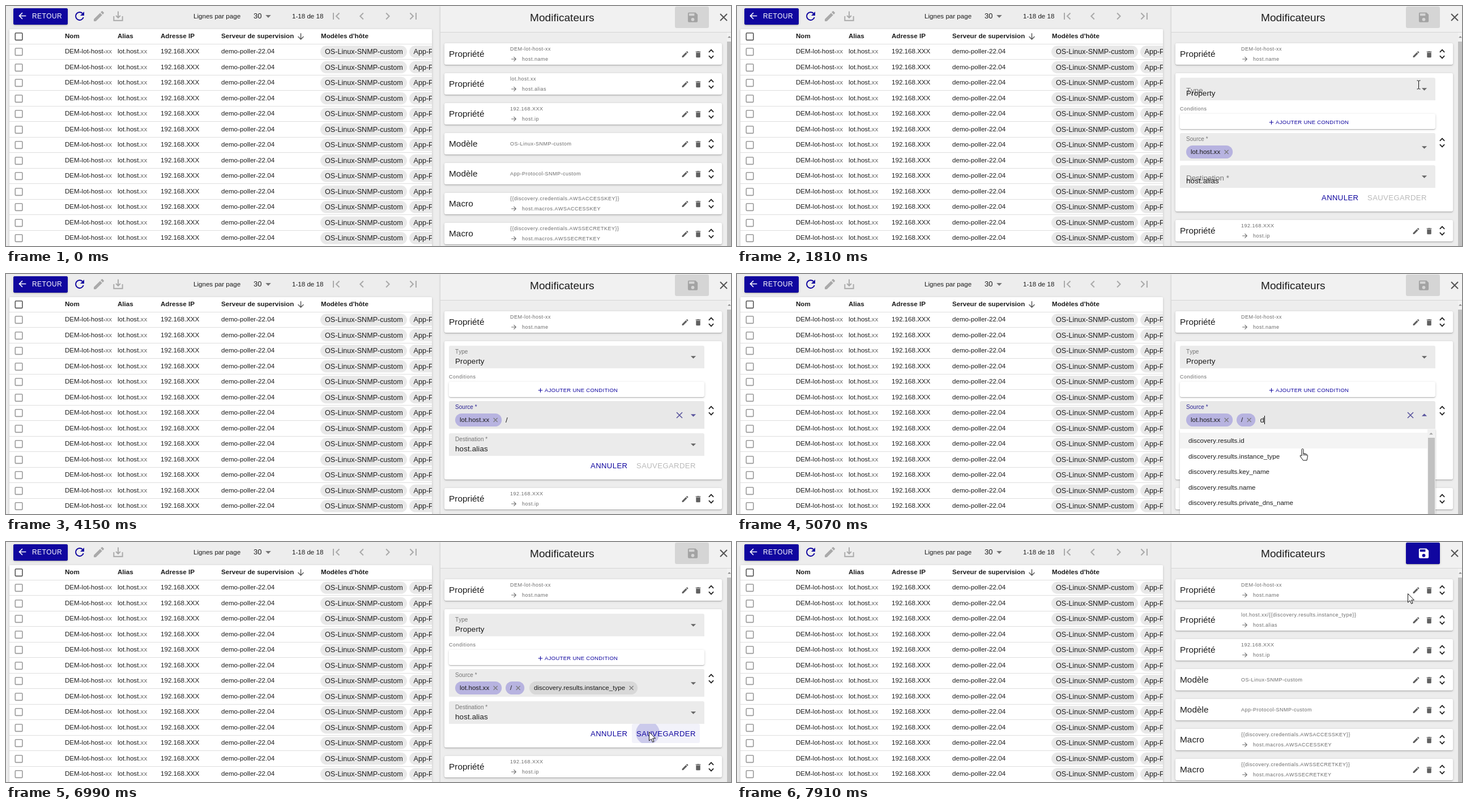
Write an HTML page with a canvas that moves like this. It is 1280 px wide and 425 px high and loops after 8 s.

```html
<!DOCTYPE html>
<html lang="fr">
<head>
<meta charset="utf-8">
<title>Modificateurs</title>
<style>
html, body { margin: 0; height: 100%; overflow: hidden; background: #ededed; }
canvas { display: block; }
</style>
</head>
<body>
<canvas id="stage" width="1280" height="425"></canvas>
<script>
const c = document.getElementById('stage').getContext('2d');
const BLUE = '#10069f', INK = '#1c1c1c', GREY = '#757575', PALE = '#a9a9a9';
const HOST = 'DEM-lot-host-', ALIAS = 'lot.host.', IP = '192.168.XXX';

// Icons on a 24 unit grid: [stroked path, filled path]
const ICONS = {
  back: ['M20 12H5M12 5l-7 7 7 7'],
  forward: ['M4 12h15M12 5l7 7-7 7'],
  down: ['M12 4v15M5 12l7 7 7-7'],
  close: ['M6 6l12 12M18 6L6 18'],
  plus: ['M12 5v14M5 12h14'],
  unfold: ['M7.5 8.5L12 4l4.5 4.5M7.5 15.5L12 20l4.5-4.5'],
  first: ['M17.5 6.5L12 12l5.5 5.5M7 6v12'],
  prev: ['M14.5 6.5L9 12l5.5 5.5'],
  next: ['M9.5 6.5L15 12l-5.5 5.5'],
  last: ['M6.5 6.5L12 12l-5.5 5.5M17 6v12'],
  refresh: ['M18.7 14A7 7 0 1 1 17 7', 'M13 11h7V4z'],
  download: ['M4 12v8h16v-8M12 3v12M8 11l4 4 4-4'],
  caret: ['', 'M7 10l5 5 5-5z'],
  caretUp: ['', 'M7 14l5-5 5 5z'],
  edit: ['', 'M3 17.3V21h3.7L17.8 9.9l-3.7-3.7zM20.7 7c.4-.4.4-1 0-1.4l-2.3-2.3c-.4-.4-1-.4-1.4 0l-1.9 1.8 3.8 3.8z'],
  trash: ['', 'M6 19q0 2 2 2h8q2 0 2-2V7H6zM19 4h-3.5l-1-1h-5l-1 1H5v2h14z'],
  save: ['', 'M17 3H5q-2 0-2 2v14q0 2 2 2h14q2 0 2-2V7zM12 19a3 3 0 1 1 0-6 3 3 0 0 1 0 6zM15 9H5V5h10z'],
};
for (const k in ICONS) ICONS[k] = ICONS[k].map(d => new Path2D(d));

const ARROW = new Path2D('M0 0V15.5l3.6-3.3 2.5 5.6 2.4-1-2.4-5.4H11z');
const HAND = new Path2D('M-3.5 1.5c0-2 3-2 3 0V8l5.5 1.7q2.5 1 2 4L5.5 20.5H-1L-6 13.5q-.8-2.2 1-2l1.5 1.2z');
const BEAM = new Path2D('M-3-7.5h2L0-6.5l1-1h2M0-6.5v13M-3 7.5h2l1-1 1 1h2');

function icon(name, x, y, size, color) {
  const [line, solid] = ICONS[name];
  c.save();
  c.translate(x - size / 2, y - size / 2);
  c.scale(size / 24, size / 24);
  c.strokeStyle = c.fillStyle = color;
  c.lineWidth = 2;
  c.stroke(line);
  if (solid) c.fill(solid, 'evenodd');
  c.restore();
}

// Text with its capitals centred on y and a whole-pixel baseline; returns the width
function text(str, x, y, size, color = INK, gap = 0, weight = 400) {
  c.font = `${weight} ${size}px "Liberation Sans", Arial, sans-serif`;
  c.fontKerning = 'none';
  c.letterSpacing = gap + 'px';
  c.fillStyle = color;
  c.fillText(str, x, Math.round(y + size * .36 - .2));
  return c.measureText(str).width;
}
const small = (str, x, y) => text(str, x, y, 9, '#6b6b6b', .5);

// Rounded box; a raised one has a tight shadow below and a faint wide one
function box(x, y, w, h, r, fill, raised) {
  c.save();
  c.fillStyle = fill;
  c.beginPath();
  c.roundRect(x, y, w, h, r);
  if (raised) {
    c.shadowOffsetY = 1;
    c.shadowColor = 'rgba(0,0,0,.16)';
    c.shadowBlur = 4;
    c.fill();
    c.shadowColor = 'rgba(0,0,0,.22)';
    c.shadowBlur = 1;
  }
  c.fill();
  c.restore();
}

function disc(x, y, r, fill) {
  c.fillStyle = fill;
  c.beginPath();
  c.arc(x, y, r, 0, 7);
  c.fill();
}

function checkbox(y, color) {
  c.strokeStyle = color;
  c.lineWidth = 1.6;
  c.beginPath();
  c.roundRect(16.3, y - 6.2, 12.6, 12.6, 1.5);
  c.stroke();
}

function drawTable() {
  box(13, 4, 96, 29, 3, BLUE, true);
  icon('back', 29, 17.5, 19, '#fff');
  text('RETOUR', 46, 17.5, 12, '#fff', .4);
  icon('refresh', 130, 18, 24, BLUE);
  icon('edit', 164, 18, 24, PALE);
  icon('download', 198, 18, 23, PALE);
  text('Lignes par page', 331, 18, 11.6);
  text('30', 437, 18, 13);
  icon('caret', 463, 18, 23, GREY);
  text('1-18 de 18', 505, 18, 11.6);
  ['first', 'prev', 'next', 'last'].forEach((n, i) => icon(n, 583 + i * 45.3, 18, 24, PALE));

  box(6, 41, 746, 400, 2, '#fff', true);
  c.save();
  c.beginPath();
  c.rect(6, 40, 746, 385);
  c.clip();
  checkbox(54, '#555');
  [['Nom', 104], ['Alias', 197], ['Adresse IP', 273], ['Serveur de supervision', 380], ["Modèles d'hôte", 556]]
    .forEach(([s, x]) => text(s, x, 53, 11.6, INK, 0, 700));
  icon('down', 520.5, 54, 17, '#555');
  for (let i = 0; i < 13; i++) {
    const y = 80.3 + i * 27.5;
    c.fillStyle = '#dedede';
    c.fillRect(6, Math.round(y - 13.5), 746, 1);
    checkbox(Math.round(y + 1), '#9a9a9a');
    [[HOST, 104], [ALIAS, 197]].forEach(([s, x]) => text('xx', x + text(s, x, y, 11.6), y, 11.6, '#666'));
    text(IP, 273, y, 11.6);
    text('demo-poller-22.04', 380, y, 11.6);
    box(555, y - 10, 153, 21.5, 10.7, '#e8e8e8');
    box(712, y - 10, 170, 21.5, 10.7, '#e8e8e8');
    text('OS-Linux-SNMP-custom', 563, y + .5, 12.6);
    text('App-Protocol-SNMP-custom', 719.5, y + .5, 12.6);
  }
  c.restore();
}

function drawPanel(saved) {
  box(767, 0, 520, 440, 0, '#ededed', true);
  c.fillStyle = '#f1f1f1';
  c.fillRect(767, 0, 513, 46);
  c.fillStyle = '#d6d6d6';
  c.fillRect(767, 46, 513, 1);
  text('Modificateurs', 925, 20, 19.1);
  box(1181, 1, 60, 38, 3, saved ? BLUE : '#d5d5d5', saved);
  icon('save', 1212.5, 20, 23, saved ? '#fff' : '#a3a3a3');
  icon('close', 1267, 20, 24, '#555');
  c.fillStyle = '#f1f1f1';
  c.fillRect(1273, 47, 7, 378);
  c.fillStyle = '#c1c1c1';
  c.fillRect(1273, 63, 7, 362);
  icon('caretUp', 1277, 55, 14, '#888');
}

function card(y, title, top, bottom) {
  box(774, y, 490, 38, 3, '#fff', true);
  text(title, 782, y + 19, 15.4);
  small(top, 890, y + (bottom ? 10 : 19));
  if (bottom) {
    icon('forward', 896.5, y + 28, 13, '#6b6b6b');
    small(bottom, 911, y + 28);
  }
  icon('edit', 1199, y + 19.5, 14.5, '#606060');
  icon('trash', 1222, y + 19.5, 15, '#606060');
  icon('unfold', 1245, y + 19, 22, '#222');
}

function drawList(alias) {
  const cred = k => ['Macro', `{{discovery.credentials.${k}}}`, 'host.macros.' + k];
  [['Propriété', HOST + 'xx', 'host.name'],
   ['Propriété', alias, 'host.alias'],
   ['Propriété', IP, 'host.ip'],
   ['Modèle', 'OS-Linux-SNMP-custom'],
   ['Modèle', 'App-Protocol-SNMP-custom'],
   cred('AWSACCESSKEY'), cred('AWSSECRETKEY')].forEach((row, i) => card(66 + i * 53, ...row));
}

function chip(x, label, fill) {
  const w = text(label, -999, 0, 11.6) + 30;
  box(x, 247, w, 23, 11.5, fill);
  text(label, x + 8, 258, 11.6);
  icon('close', x + w - 11, 258.5, 14, '#777');
}

// Label that shrinks towards the top of its field as p goes from 0 to 1
const label = (str, y, p, color = GREY) => text(str, 793, y - 11 * p, 13.4 - 3.3 * p, color);
const caret = x => { c.fillStyle = '#000'; c.fillRect(x, 251, 1, 15); };
const within = (t, a, b) => t >= a && t < b;

function drawForm(t, pos) {
  const shrunk = 1 - (1 - Math.min(1, Math.floor((t - 1810) / 100) / 2)) ** 2;
  const menu = within(t, 3110, 3630) || within(t, 4550, 5570);
  const focus = within(t, 3210, 6890);
  const tone = focus ? '#2b2394' : GREY;

  card(66, 'Propriété', HOST + 'xx', 'host.name');
  card(379, 'Propriété', IP, 'host.ip');
  box(774, 119, 490, 245, 3, '#fff', true);
  icon('unfold', 1245, 242, 22, '#222');

  box(782, 127, 451, 40, [3, 3, 0, 0], '#ebebeb');
  label('Type', 149, shrunk);
  text('Property', 793, 154.5, 13.4, INK, .13);
  icon('caret', 1213.5, 147, 22, '#666');

  small('Conditions', 782, 181.5);
  box(782, 191, 451, 27, 3, '#fff', true);
  icon('plus', 943.5, 206, 13, BLUE);
  text('AJOUTER UNE CONDITION', 951, 206, 9.5, BLUE, .3);

  box(782, 225, 451, 49, [3, 3, 0, 0], focus ? '#e8e8e8' : '#ebebeb');
  label('Source *', 247, 1, tone);
  chip(793, ALIAS + 'xx', '#b7b3e0');
  if (t >= 4550) chip(882, '/', '#b7b3e0');
  if (t >= 5570) chip(924, 'discovery.results.instance_type', '#d8d8d8');
  if (within(t, 3630, 4550)) text('/', 882, 258, 13.4);
  if (within(t, 4750, 5570)) text('d', 923.5, 258, 13.4);
  if (within(t, 3110, 3630)) caret(882);
  if (within(t, 3630, 4150)) caret(886);
  if (within(t, 4550, 4750)) caret(924);
  if (within(t, 4750, 5570)) caret(931);
  if (within(t, 6190, 6690)) caret(1121);
  if (within(t, 2810, 6890)) icon('close', 1189, 250, 20, focus ? '#5a559e' : '#666');
  icon(menu ? 'caretUp' : 'caret', 1213.5, 250, 22, focus ? '#5a559e' : '#666');

  box(782, 282, 451, 40, [3, 3, 0, 0], '#ebebeb');
  label('Destination *', 304, shrunk);
  text('host.alias', 793, 309.5, 13.4, INK, .13);
  if (within(t, 5570, 6890) && pos && pos[1] < 322) icon('close', 1189, 302, 20, '#666');
  icon('caret', 1213.5, 302, 22, '#666');

  text('ANNULER', 1032, 339, 13.1, BLUE, .4);
  if (t >= 6590) {
    c.save();
    c.beginPath();
    c.roundRect(1105, 322, 120, 34, 3);
    c.clip();
    c.fillStyle = 'rgba(16,6,159,.05)';
    c.fillRect(1105, 322, 120, 34);
    if (t >= 6990) disc(1133, 338, t < 7090 ? 21 : 50, 'rgba(16,6,159,.17)');
    c.restore();
  }
  text('SAUVEGARDER', 1113, 339, 13.1, t < 5570 ? '#b9b9b9' : BLUE, .4);

  if (menu) drawMenu(t);
}

function drawMenu(t) {
  box(782, 275, 451, 170, 0, '#fff', true);
  const hover = within(t, 4950, 5170) ? 0 : t >= 5170 ? 1 : -1;
  ['id', 'instance_type', 'key_name', 'name', 'private_dns_name'].forEach((s, i) => {
    const y = 295 + i * 27.6;
    if (i === hover) {
      c.fillStyle = '#f4f4f4';
      c.fillRect(782, Math.round(y - 13.8), 437, 28);
    }
    text('discovery.results.' + s, 797, y, 11.6);
  });
  c.fillStyle = '#f1f1f1';
  c.fillRect(1219, 275, 14, 150);
  c.fillStyle = '#c1c1c1';
  c.fillRect(1220, 290, 12, 135);
  icon('caretUp', 1225.5, 283, 16, '#a0a0a0');
}

// Pointer legs: start, number of 100 ms steps, from, to
const LEGS = [
  [690, 8, [1195, 450], [1203, 139]],
  [2510, 5, [1203, 139], [1120, 257]],
  [4850, 3, [1120, 257], [1000, 309]],
  [5170, 1, [1000, 309], [1000, 312]],
  [6190, 6, [1000, 312], [1135, 336]],
  [7710, 3, [1135, 336], [1184, 91]],
];

function pointerAt(t) {
  if (t < 690 || within(t, 3430, 4850)) return null;
  const [start, n, a, b] = LEGS.filter(l => l[0] <= t).pop();
  const k = Math.min(1, (Math.floor((t - start) / 100) + 1) / n);
  const p = k * k * (3 - 2 * k);
  return a.map((v, i) => v + (b[i] - v) * p);
}

function pointerKind(t, [x, y]) {
  if (within(t, 1390, 1810) || within(t, 4850, 5570) || within(t, 6590, 6990)) return HAND;
  const onField = within(y, 127, 167) || within(y, 225, 274) || within(y, 282, 322);
  return within(t, 1810, 6590) && onField ? BEAM : ARROW;
}

function drawPointer(t, pos) {
  if ([1510, 3110, 5370, 6890].some(s => within(t, s, s + 100))) disc(pos[0] - 2, pos[1] - 1, 14.5, 'rgba(244,236,50,.8)');
  const kind = pointerKind(t, pos);
  c.save();
  c.translate(Math.round(pos[0]) + .5, Math.round(pos[1]) + .5);
  c.lineWidth = 1;
  c.lineJoin = 'round';
  c.strokeStyle = '#111';
  c.fillStyle = '#fff';
  if (kind !== BEAM) c.fill(kind);
  c.stroke(kind);
  if (kind === HAND) c.stroke(new Path2D('M2 9v3M4.5 10v2.5M-.5 8v4'));
  c.restore();
}

function draw(now) {
  const t = now % 8000;
  const pos = pointerAt(t);
  c.fillStyle = '#ededed';
  c.fillRect(0, 0, 1280, 425);
  drawTable();
  drawPanel(t >= 7190);
  if (within(t, 1810, 7190)) drawForm(t, pos);
  else drawList(ALIAS + (t < 1810 ? 'xx' : 'xx/{{discovery.results.instance_type}}'));
  if (pos) drawPointer(t, pos);
  requestAnimationFrame(draw);
}
requestAnimationFrame(draw);
</script>
</body>
</html>
```
